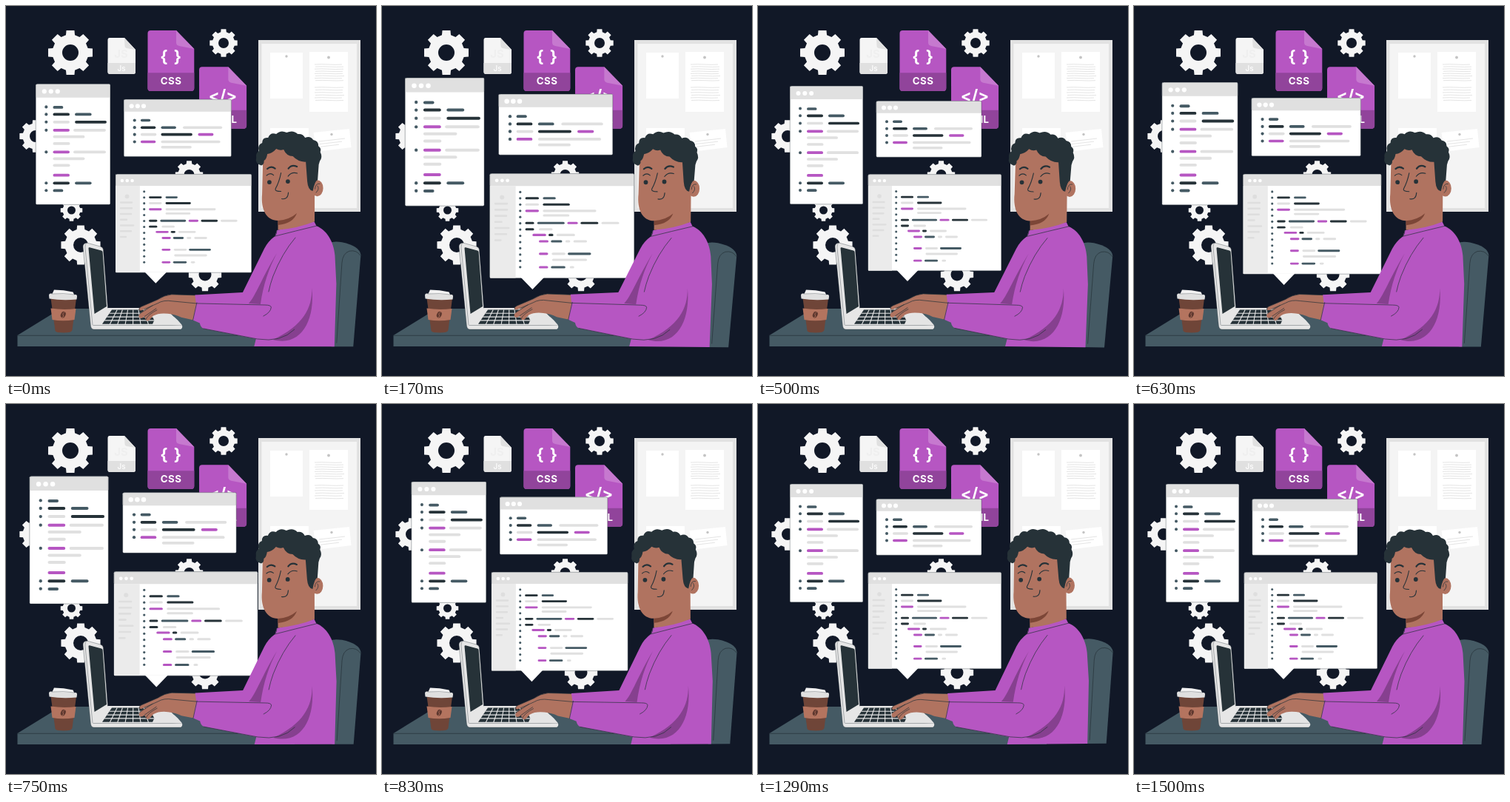
An HTML page that plays this animation: 500 by 500 pixels, repeating every 1540 ms.

```html
<!DOCTYPE html>
<html lang="en">
<head>
<meta charset="utf-8">
<title>Developer at work</title>
<style>
html, body { margin: 0; width: 100%; height: 100%; overflow: hidden; background: #111827; }
svg { display: block; width: 100vw; height: 100vh; }
text { font-family: Inter, sans-serif; font-weight: 700; text-anchor: middle; fill: #fff; }
.line { fill: none; stroke: #263238; stroke-width: .7; stroke-linecap: round; stroke-linejoin: round; }
.thin { stroke-width: .35; }
.face { stroke-width: 1.1; }
.brow { stroke-width: 2.2; }
.skin { fill: #b07360; }
.top { fill: #b656c2; }
.shade { fill: #86408f; }
.ink { fill: #263238; }
.slate { fill: #455a64; }
</style>
</head>
<body>
<svg viewBox="0 0 500 500">
  <!-- pin board -->
  <path fill="#e2e2e2" d="M341 46H479V278H341Z"/>
  <path fill="#f4f4f4" d="M345.500 51H474V273H345.500Z"/>
  <path fill="#fff" d="M357 63H401V125H357ZM410 62H462V143H410ZM357 165H409V230H357ZM415.500 171L464 166L466.500 191L419 197Z"/>
  <g fill="#c4c4c4"><circle cx="379" cy="68" r="1.700"/><circle cx="436" cy="69.500" r="1.900"/><circle cx="440" cy="173.500" r="1.700"/></g>
  <g id="notes" fill="none" stroke="#d8d8d8" stroke-width=".7"></g>

  <g id="gears" fill="#f5f5f5" fill-rule="evenodd"></g>

  <!-- files -->
  <path fill="#f5f5f5" d="M140 43H160L175 59V89Q175 92 172 92H140.500Q137.500 92 137.500 89V46Q137.500 43 140 43Z"/>
  <path fill="#e0e0e0" d="M137.500 77H175V89Q175 92 172 92H140.500Q137.500 92 137.500 89ZM160 43L175 59L163 57Q160.500 56.500 160.500 54Z"/>
  <text x="155.500" y="69.500" font-size="15" style="fill:#efefef">JS</text>
  <text x="156" y="88" font-size="10" style="font-weight:500">Js</text>
  <g id="file">
    <path class="top" d="M195.500 33H230L254.300 58V111Q254.300 115 250.300 115H195.500Q191.500 115 191.500 111V37Q191.500 33 195.500 33Z"/>
    <path fill="#91449b" d="M191.500 90.300H254.300V111Q254.300 115 250.300 115H195.500Q191.500 115 191.500 111Z"/>
    <path fill="#c679cf" d="M230 33L254.300 58L234 54Q230 53 230 49.500Z"/>
  </g>
  <use href="#file" transform="translate(65.700 48.600) scale(1.020)"/>
  <text x="222.700" y="76" font-size="22" style="word-spacing:3px">{ }</text>
  <text x="223" y="105.800" font-size="13.300" letter-spacing=".5">CSS</text>
  <text x="293" y="129" font-size="22">&lt;/&gt;</text>
  <text x="292.500" y="158.300" font-size="13.200" letter-spacing=".2">HTML</text>

  <g id="windows"></g>

  <!-- desk -->
  <path class="slate" d="M15.500 445L74 409H390V460H15.500Z"/>
  <path class="line" d="M15.500 445.300H390"/>

  <!-- cup -->
  <path fill="#6f4538" d="M60.500 395H95L89.500 438Q89 441.500 78 441.500Q67 441.500 66.500 439Z"/>
  <path fill="#b4745f" d="M60.500 408.500Q77 411 94.500 409L92.500 424Q77 426.500 62.500 424Z"/>
  <ellipse cx="77.300" cy="417.200" rx="3.200" ry="4.400" fill="#5d372e" transform="rotate(25 77.300 417.200)"/>
  <path fill="none" stroke="#b4745f" stroke-width=".8" d="M79 413.500Q75.500 416 77.300 418T75.500 421"/>
  <path fill="#f2f2f2" d="M65 383.500Q78 383.500 90.500 386.500L92.500 391L62 390Z"/>
  <path fill="#e0e0e0" d="M60 388.500L94.500 390Q96.500 390.500 96 393L95.500 396.500Q76 398.500 58.500 395.500L58 391Q58 388.500 60 388.500Z"/>
  <path class="line" d="M62 389Q77 387.500 93 390" opacity=".45"/>

  <!-- laptop -->
  <path fill="#e6e6e6" d="M104 325Q104 321 109 320L127.500 325Q131 326 131.400 329L137.500 408H215L238 431.500Q239 435 236 437H119Q115 437 114.400 432Z"/>
  <path class="line" d="M109 320L127.500 325Q131 326 131.400 329L137.500 408M118 431.500H238M104 325Q104 321 109 320Q106.500 322 107 327L117 431M104 325L114.400 432Q115 437 119 437H236" opacity=".5"/>
  <path class="ink" d="M111.500 327.500Q111.500 326 113 326.300L129 330.500Q130.500 331 130.600 332.500L136 406L119.500 416Z"/>
  <path class="ink" d="M143 410.500H193L203 429.800H130Z"/>
  <g id="keys" stroke="#e6e6e6" stroke-width="1.100"></g>
  <path fill="#e4e4e4" d="M198 430Q204 414 218 416Q228 418 238 431.500Z"/>

  <!-- person and chair -->
  <g id="person">
    <path class="slate" d="M432 321Q442 317 454 319Q478 324 479.500 336L469.500 460H440Z"/>
    <path class="line" d="M479 337Q474 329 464 331Q455 334 454 347L447 455"/>
    <!-- hands -->
    <path class="skin" d="M258 391L224 390Q214 391 205 397L183 406.500Q179 408.500 180 411Q182 413 187 410L190 409L181 416Q178.500 419 180.500 421.500Q183 423.500 187 420L189 424Q191 427 194 424.500L199 419Q207 414.500 219 416Q229 417 237 421L256 425Z"/>
    <path class="line" d="M258 391L224 390Q214 391 205 397L183 406.500Q179 408.500 180 411M187 410L205 402Q213 397 225 399L257 402M181 416L198 405M187 420L203 409M189 424Q192 417 204 411"/>
    <!-- sweater -->
    <path class="top" d="M366 303L416.500 291L419.500 297C433 302 443 318 444.500 337L446.500 375L444 460H335.500L338 450L267 436Q263 434 262 428.500L252.800 424.500L257 402L255.500 390.500L320 387L349 328Q354 318 363.500 311Z"/>
    <path class="shade" d="M366 334C355 355 348 376 344 403L328 402C337 393 346 367 366 334Z"/>
    <path class="shade" d="M413.500 381C414 408 402 432 361 451C399 461 418 425 413.500 381Z"/>
    <path class="line" d="M363.500 311Q366 308 366 303M363.500 311Q391 304 419.500 297M391 313Q373 334 361 365Q357 376 355 386M257 402L350 404Q358 404 358.500 407Q358 414 348 419M267 436L340 450Q372 455 390 437M252.800 424.500L258 401"/>
    <!-- head -->
    <ellipse class="skin" cx="420.500" cy="246" rx="8" ry="11"/>
    <path class="skin" d="M347 208L346 254C344 275 352 290 367.500 290V302.500Q395 300 417 291V205L380 185L358 190Z"/>
    <path fill="#7c4637" d="M367.500 290Q383 289 393 280Q388 294 367.500 296Z"/>
    <path class="ink" d="M345 215.500Q336 213 338 205Q337 199 341.500 196Q339 188 346 185Q346 177 354 178Q357 170 365 173Q371 167 379 171Q388 167 394 173Q401 172 404 178Q411 175 415 181Q422 182 422 189Q426.500 192 424.500 197Q428 204 424 209L422.500 214L421 235Q417 236 414.500 250Q408 249 407 237L405 210.500Q395 211 387.500 203Q379 203 375 194Q370 196 365 193Q360 199 353 200Q352 207 348.500 209Q349 214 345 215.500Z"/>
    <circle class="ink" cx="355.800" cy="238" r="2.900"/>
    <circle class="ink" cx="380.800" cy="237" r="2.900"/>
    <path class="line brow" d="M353 220Q358 215.500 363.500 219.500M381.500 219.500Q386 213.500 393 217"/>
    <path class="line face" d="M352 229Q357 224.500 361.500 228.500M381 230Q386 223.500 393.500 226M371.500 225.500Q369 238 364 247Q363 250.500 371.500 250.500M372.500 260.500Q381 262 381.500 252"/>
    <path class="line" d="M424 240Q418 239 417.500 247M421 243Q424 247 419 252"/>
  </g>
</svg>
<script>
const $ = id => document.getElementById(id);
const rect = (x, y, w, h, fill, r = 0) =>
  `<rect x="${x}" y="${y}" width="${w}" height="${h}" rx="${r}" fill="${fill}"/>`;
const dot = (x, y, r, fill) => `<circle cx="${x}" cy="${y}" r="${r}" fill="${fill}"/>`;
const COLORS = { d: '#263238', s: '#455a64', g: '#e0e0e0', p: '#b656c2' };

// Eight-toothed wheel with a round hole
function gear(x, y, r, hole) {
  let d = '';
  for (let i = 0; i < 8; i++) {
    const a = i * Math.PI / 4;
    [[-.25, .8], [-.18, 1], [.18, 1], [.25, .8]].forEach(([da, k]) => {
      d += `${d ? 'L' : 'M'}${x + r * k * Math.cos(a + da)} ${y + r * k * Math.sin(a + da)}`;
    });
  }
  return `<path d="${d}ZM${x - hole} ${y}a${hole} ${hole} 0 1 0 ${2 * hole} 0a${hole} ${hole} 0 1 0 ${-2 * hole} 0Z"/>`;
}
$('gears').innerHTML = [
  [87, 63, 30.5, 11], [294, 50, 19, 7], [40, 176, 22, 8], [88.5, 276, 15, 5.5],
  [101, 323, 27, 10], [247.5, 228, 19, 7], [269, 363, 22.5, 8.5]
].map(g => gear(...g)).join('');

let notes = '';
for (let i = 0; i < 14; i++) {
  const y = i < 8 ? 79 + i * 3.1 : 110 + (i - 8) * 3.5;
  notes += `M${417 + i % 2} ${y}q10 -.6 19 0t${18 + i % 3} 0`;
}
for (let i = 0; i < 3; i++) notes += `M${423 + i} ${183 + i * 3.6}l${35 - i * 5} ${-4 + i * .5}`;
$('notes').innerHTML = `<path d="${notes}"/>`;

let keys = '';
for (let i = 1; i < 4; i++) keys += `M${143 - i * 3.3} ${410.5 + i * 4.8}H${193 + i * 2.5}`;
for (let i = 1; i < 7; i++) keys += `M${143 + i * 7.2} 410.5L${130 + i * 10.4} 430`;
$('keys').innerHTML = `<path d="${keys}"/>`;

// Row: y, then colour, start and end of each bar
const bars = (rows, h) => rows.map(([y, ...b]) => {
  let out = '';
  for (let i = 0; i < b.length; i += 3)
    out += rect(b[i + 1], y - h / 2, b[i + 2] - b[i + 1], h, COLORS[b[i]], h / 2);
  return out;
}).join('');

const dots = (x, ys, r) => ys.map(y => dot(x, y, r, COLORS.s)).join('');

function frame(x, y, w, h, head, r, first, gap) {
  let out = rect(x, y, w, h, '#fff', 1.5) + rect(x, y, w, head, '#e0e0e0', 1.5);
  for (let i = 0; i < 3; i++) out += dot(first + i * gap, y + head / 2 + .8, r, '#fff');
  return out + `<rect x="${x}" y="${y}" width="${w}" height="${h}" rx="1.5" class="line thin"/>`;
}

const tall = frame(43.2, 108.2, 98.6, 159.6, 17.8, 3, 54.5, 8.8) + bars([
  [139, 's', 66, 79.5],
  [148.3, 'd', 66, 88, 's', 95, 117],
  [158.5, 'g', 66, 88, 'd', 95, 137],
  [169.3, 'p', 66, 88, 'g', 93, 136],
  [178, 'g', 66, 108],
  [187, 'g', 66, 88.5],
  [198.2, 'p', 66, 88, 'g', 93, 136],
  [207, 'g', 66, 108],
  [215.8, 'g', 66, 88.5],
  [228.9, 'p', 66, 88],
  [239.3, 'd', 66, 88, 's', 95, 117],
  [249.2, 's', 66, 79.5]
], 3.7) + dots(57, [138.5, 148.3, 158.5, 169.3, 198.2, 239.3, 249], 2);

const wide = frame(159.8, 128.5, 142.2, 75.7, 16.2, 3, 170, 8) + bars([
  [156.2, 's', 182, 195],
  [165.7, 'd', 182, 202, 's', 209, 229, 'g', 238, 290],
  [175, 'g', 182, 203, 'd', 209, 250.5, 'p', 258, 278.5],
  [184.6, 'p', 182, 202, 'g', 209, 287.5],
  [191.7, 'g', 209, 249.5]
], 3.5) + dots(174, [156.2, 165.7, 175, 184.6], 2);

const side = [17, 17, 16, 10, 19, 16, 9].map((w, i) =>
  rect(154.5, 263.8 + i * 7.6, w, 2.4, '#dedede', 1)).join('');
const gutter = Array.from({ length: 13 }, (_, i) => 250.5 + i * 7.8);
const editor = frame(148.8, 227.6, 180, 130.2, 15.4, 2.2, 157.5, 6.7)
  + rect(149, 243, 32, 114.6, '#ebebeb') + dot(164, 257, 2.8, '#dedede') + side
  + '<path fill="#fff" d="M187.5 357H216.500L202 372Z"/>'
  + bars([
    [258.2, 'd', 193, 210, 's', 215, 231],
    [266, 'g', 193, 210, 'd', 215, 248.5],
    [274, 'p', 193, 210, 'g', 215, 281.5],
    [279.6, 'g', 215, 248],
    [289.2, 'd', 193, 204, 's', 208, 242, 'p', 245.5, 258.5, 'd', 262, 284, 'g', 288, 310],
    [297, 'd', 193, 204, 'g', 210, 227],
    [304, 'p', 202, 219, 'd', 222, 228, 'g', 232, 255],
    [312, 'p', 210, 222, 's', 225, 239, 'g', 243, 249, 'g', 253, 270],
    [327.5, 'p', 210, 221.5, 'g', 226, 243, 's', 246, 275],
    [335, 'g', 226.5, 270],
    [344.2, 'p', 210, 221.5, 's', 225, 243, 'g', 248.5, 254]
  ], 2.8) + dots(186.7, gutter, 1.5);

$('windows').innerHTML = tall + wide + editor;

// Linear tracks: [share of the cycle, value]
const PULSE = [[0, 1], [.1, 1.1], [.3, 1], [.4, 1], [.5, 1.1], [.6, 1], [1, 1]];
const SWAY = [[0, 0], [.25, 1], [.75, -1], [1, 0]];
const LOOP = 1540, CYCLE = 1500, STEP = 1000 / 24, LEAD = 31;

function track(keys, p) {
  const i = Math.max(1, keys.findIndex(k => k[0] >= p));
  const [a, from] = keys[i - 1], [b, to] = keys[i];
  return from + (to - from) * (p - a) / (b - a);
}

function draw() {
  const n = Math.floor((performance.now() % LOOP + 5) / STEP);
  const p = n >= 36 ? 0 : (n * STEP + LEAD) / CYCLE;
  $('windows').setAttribute('transform',
    `translate(186 240) scale(${track(PULSE, p)}) translate(-186 -240)`);
  $('person').setAttribute('transform', `rotate(${track(SWAY, p)} 329 314)`);
  requestAnimationFrame(draw);
}
draw();
</script>
</body>
</html>
```
